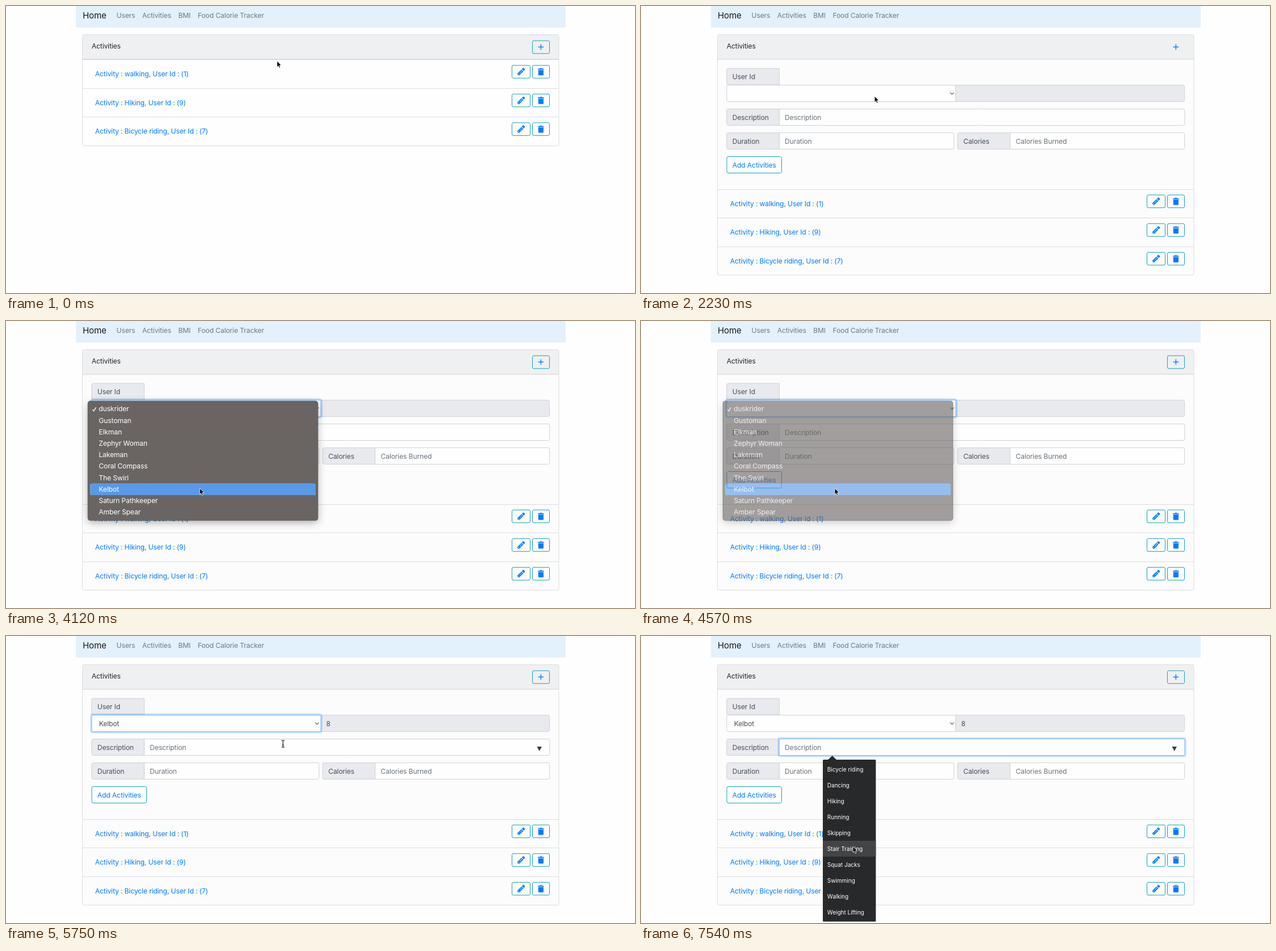
Animation of 1107 by 506 pixels, one loop 7.99 s. Source, as an HTML page with a canvas:

```html
<!DOCTYPE html>
<html lang="en">
<head>
<meta charset="utf-8">
<title>Activities</title>
<style>
html, body { margin: 0; width: 100%; height: 100%; overflow: hidden; background: #fefefe; }
canvas { display: block; width: 1107px; height: 506px; }
</style>
</head>
<body>
<canvas id="stage"></canvas>
<script>
const W = 1107, H = 506, LOOP = 7990, TICK = 147.3;
const canvas = document.getElementById('stage');
const ctx = canvas.getContext('2d');
const dpr = window.devicePixelRatio || 1;
canvas.width = W * dpr;
canvas.height = H * dpr;

const BLUE = '#007bff', TEAL = '#17a2b8', EDGE = '#ced1d6', ADDON = '#e9eaee';
const PAGE = '#fefefe', PANEL = '#fcfcfc', LINE = '#dcdddf';
const INK = '#212529', LABEL = '#495057', HINT = '#6c757d';
const ROW = 50.6, OPTION = 20.2, SPORT = 28;

const heroes = ['duskrider', 'Gustoman', 'Elkman', 'Zephyr Woman', 'Lakeman',
  'Coral Compass', 'The Swirl', 'Kelbot', 'Saturn Pathkeeper', 'Amber Spear'];
const sports = ['Bicycle riding', 'Dancing', 'Hiking', 'Running', 'Skipping',
  'Stair Training', 'Squat Jacks', 'Swimming', 'Walking', 'Weight Lifting'];
const entries = ['walking, User Id : (1)', 'Hiking, User Id : (9)', 'Bicycle riding, User Id : (7)'];

// pointer moves: first tick, last tick, destination
const moves = [
  [0, 1, 560, 102], [2, 7, 938, 68], [10, 12, 487, 187], [13, 15, 411, 159],
  [17, 20, 387.5, 261], [20, 21, 368, 272], [25, 28, 341, 295],
  [31, 39, 487.5, 190], [41, 49, 373, 371]
];

const clamp = v => Math.min(1, Math.max(0, v));
const smooth = v => v * v * (3 - 2 * v);
const within = (t, a, b) => t >= a && t < b;

function pointer(tick) {
  let x = 477, y = 97;
  for (const [a, b, toX, toY] of moves) {
    const k = smooth(clamp((tick - a) / (b - a)));
    x += (toX - x) * k;
    y += (toY - y) * k;
  }
  return { x, y };
}

function text(s, x, y, color = INK, size = 12.13, track = -0.14) {
  ctx.font = `${size}px Inter, "Liberation Sans", sans-serif`;
  ctx.letterSpacing = track + 'px';
  ctx.fillStyle = color;
  ctx.fillText(s, x, y);
  return ctx.measureText(s).width;
}

function rect(x, y, w, h, color) {
  ctx.fillStyle = color;
  ctx.fillRect(x, y, w, h);
}

function stroke(color, width = 1) {
  ctx.strokeStyle = color;
  ctx.lineWidth = width;
  ctx.stroke();
}

function box(x, y, w, h, r, fill, edge, width) {
  ctx.beginPath();
  ctx.roundRect(x, y, w, h, r);
  if (fill) { ctx.fillStyle = fill; ctx.fill(); }
  if (edge) stroke(edge, width);
}

function path(...points) {
  ctx.beginPath();
  points.forEach(p => ctx.lineTo(p[0], p[1]));
}

function poly(fill, ...points) {
  path(...points);
  ctx.closePath();
  ctx.fillStyle = fill;
  ctx.fill();
}

function placed(x, y, draw) {
  ctx.save();
  ctx.translate(x, y);
  draw();
  ctx.restore();
}

function ring(x, y, w, h) {
  box(x - 1.5, y - 1.5, w + 3, h + 3, 3, null, 'rgba(0,123,255,.25)', 2.5);
  box(x, y, w, h, 1, PAGE, '#80bdff');
}

function pencil() {
  ctx.rotate(-Math.PI / 4);
  poly(BLUE, [0, 0], [1.2, -2.3], [11.6, -2.3], [11.6, 2.3], [1.2, 2.3]);
  box(12.6, -2.3, 3.8, 4.6, [0, 1.5, 1.5, 0], BLUE);
  rect(4.6, -0.4, 6, 0.8, '#d5e8ff');
  rect(1.4, -0.8, 1.3, 1.6, '#d5e8ff');
}

function trash() {
  box(-5.4, -5.3, 10.8, 1.6, 0.6, BLUE);
  box(-2, -6.3, 4, 1.6, 0.6, BLUE);
  box(-4.6, -3, 9.2, 9.4, [0, 0, 1.3, 1.3], BLUE);
}

function button(x, y, w) {
  box(x, y, w, 22.6, 2.5, null, TEAL);
}

function nav() {
  rect(123, 0, 862, 38, '#e3f1fc');
  text('Home', 135, 22.4, '#17181a', 15.1, -0.15);
  let x = 194.5;
  for (const s of ['Users', 'Activities', 'BMI', 'Food Calorie Tracker']) {
    x += text(s, x, 21.2, '#71797e') + 12.5;
  }
}

function card(open, bare) {
  const shift = open ? 228.5 : 0;
  const height = Math.floor(196.2 + shift);
  box(134.5, 50.5, 838.5, height, 3, open ? PANEL : PAGE);
  box(134.5, 50.5, 838.5, 43.5, [3, 3, 0, 0], '#eff0f2');
  rect(135, 93.5, 838, open ? 1 : 1.5, '#d3d4d6');
  text('Activities', 150.8, 74.7);
  if (!bare) button(926.5, 61.2, 30);
  rect(936.6, 71.6, 9.6, 1.4, BLUE);
  rect(940.7, 67.5, 1.4, 9.6, BLUE);

  entries.forEach((s, i) => {
    const top = 94.4 + ROW * i + shift;
    if (i || open) rect(135, Math.round(top - 0.2), 838, 1, LINE);
    text('Activity : ' + s, 156.8, top + 29.6, BLUE);
    button(890.5, top + 10.2, 32);
    button(926.5, top + 10.2, 30);
    placed(900.6, top + 27.4, pencil);
    placed(941.4, top + 21.4, trash);
  });
  box(134.5, 50.5, 838.5, height, 3, null, LINE);
}

function field(x, y, w, label, hint, focus) {
  box(x, y, 92.5, 29, [3, 0, 0, 3], ADDON, EDGE);
  text(label, x + 10, y + 19.1, LABEL);
  if (!hint) return;
  if (focus) ring(x + 92.5, y, w - 92.5, 29);
  else box(x + 92.5, y, w - 92.5, 29, [0, 3, 3, 0], PAGE, EDGE);
  text(hint, x + 102.3, y + 19.1, HINT);
}

function form(t, typing) {
  const listed = t >= 6050;
  field(150.8, 110, 92.5, 'User Id');
  box(553.5, 139.5, 403, 29, [0, 3, 3, 0], ADDON, EDGE);
  if (within(t, 2520, 6050)) ring(151, 139.5, 403, 29);
  else box(150.8, 139.5, 403, 29, [3, 0, 0, 3], PAGE, EDGE);
  path([544.3, 152.6], [547.4, 155.7], [550.5, 152.6]);
  stroke('#555', 1.1);
  if (t >= 4720) {
    text(heroes[7], 163.7, 158.5, LABEL);
    text('8', 563.6, 158.5, LABEL);
  }
  field(150.8, 181.5, 806, 'Description', 'Description', listed);
  field(150.8, 223.5, 400, 'Duration', 'Duration');
  field(557.2, 223.5, 399.5, 'Calories', 'Calories Burned');
  box(151, 265.5, 96.5, 29, 3, PAGE, TEAL);
  text('Add Activities', 160.8, 284.6, BLUE);
  if (typing || listed) poly('#3c3f42', [934.5, 195], [943, 195], [938.7, 203]);
  if (listed && (t - 6050) % 1020 < 450) rect(253, 188, 1, 16, '#000');
}

function popup(tick) {
  const alpha = clamp(1 - 0.38 * (tick - 30));
  const row = Math.max(0, Math.floor((pointer(tick - 1).y - 145.2) / OPTION));
  const y = 145.4 + OPTION * row;
  const outline = () => ctx.roundRect(144, 141, 405, 210.8, 4.5);
  ctx.save();
  ctx.globalAlpha = alpha;

  // keep the shadow outside the panel so that it does not darken while fading
  ctx.save();
  ctx.beginPath();
  ctx.rect(0, 0, W, H);
  outline();
  ctx.clip('evenodd');
  ctx.shadowColor = 'rgba(0,0,0,.3)';
  ctx.shadowBlur = 14 * dpr;
  ctx.shadowOffsetY = 4 * dpr;
  box(144, 141, 405, 210.8, 4.5, '#6a6563');
  ctx.restore();

  ctx.beginPath();
  outline();
  ctx.roundRect(148.5, y, 396.5, OPTION, 3);
  ctx.fillStyle = '#6a6563';
  ctx.fill('evenodd');
  box(148.5, y, 396.5, OPTION, 3, '#5899e8');
  box(144, 141, 405, 210.8, 4.5, null, 'rgba(70,66,64,.5)');
  ctx.globalAlpha = Math.pow(alpha, 0.4);
  heroes.forEach((s, i) => text(s, 163.3, 159.4 + OPTION * i, '#fff'));
  path([152.4, 156], [154.6, 158.7], [158.4, 152.4]);
  stroke('#fff', 1.3);
  ctx.restore();
}

function suggestions({ x, y }) {
  poly('#28292b', [328.8, 218.5], [336.6, 211], [344.4, 218.5]);
  box(320, 218, 93.3, 285.6, 1.5, '#28292b');
  const row = Math.floor((y - 221) / SPORT);
  if (row >= 0 && within(x, 320, 413)) rect(320, 221 + SPORT * row, 93.3, SPORT, '#434446');
  sports.forEach((s, i) => text(s, 327.8, 238.7 + SPORT * i, '#fff', 10, 0));
}

function arrow() {
  poly('#000', [0, 0], [0, 10.7], [2.4, 8.5], [4.1, 12.3], [5.9, 11.5], [4.3, 7.8], [7.5, 7.6]);
  ctx.lineJoin = 'round';
  stroke('#fff', 0.8);
}

function beam() {
  ctx.beginPath();
  for (const s of [-1, 1]) {
    ctx.moveTo(-2.8, 6.3 * s);
    ctx.quadraticCurveTo(0, 6.3 * s, 0, 4.6 * s);
    ctx.quadraticCurveTo(0, 6.3 * s, 2.8, 6.3 * s);
  }
  ctx.moveTo(0, -5);
  ctx.lineTo(0, 5);
  ctx.moveTo(-1.5, 2.2);
  ctx.lineTo(1.5, 2.2);
  stroke('#111', 1.1);
}

function draw(t) {
  const tick = Math.floor((t + 20) / TICK);
  const mouse = pointer(tick);
  const open = t >= 1340;
  const menu = within(tick, 17, 33);
  const typing = open && !menu && within(mouse.x, 243, 957) && within(mouse.y, 181, 211);
  ctx.setTransform(dpr, 0, 0, dpr, 0, 0);
  rect(0, 0, W, H, PAGE);
  nav();
  card(open, within(t, 1050, 2520));
  if (open) form(t, typing);
  if (menu) popup(tick);
  if (t >= 6050) suggestions(mouse);
  placed(mouse.x, mouse.y, typing ? beam : arrow);
}

const start = performance.now();
function loop() {
  draw((performance.now() - start) % LOOP);
  requestAnimationFrame(loop);
}
loop();
</script>
</body>
</html>
```
